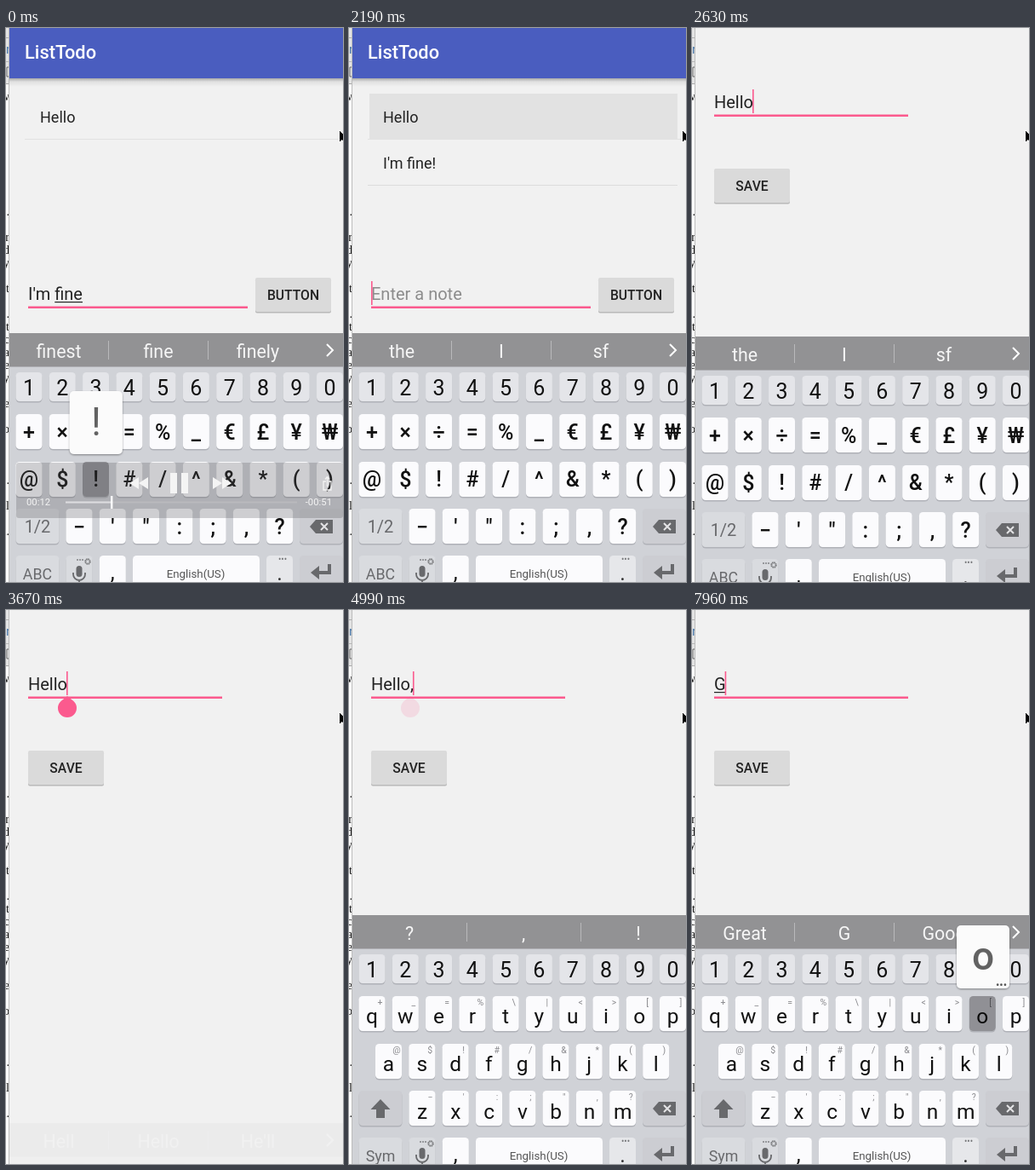
Recreate the animation shown at these times as an HTML page. Size 396x650 px, loop 8 s.

```html
<!DOCTYPE html>
<html lang="en">
<head>
<meta charset="utf-8">
<title>ListTodo</title>
<style>
  html, body { margin: 0; width: 100%; height: 100%; overflow: hidden; background: #f1f1f1; }
  svg { display: block; width: 396px; height: 650px; }
  text { font-family: Roboto, "Noto Sans", sans-serif; white-space: pre; }
</style>
</head>
<body>
<svg id="stage" viewBox="0 0 396 650">
  <defs>
    <linearGradient id="drop" x1="0" y1="0" x2="0" y2="1">
      <stop offset="0" stop-color="#000" stop-opacity=".3"/>
      <stop offset=".4" stop-color="#000" stop-opacity=".07"/>
      <stop offset="1" stop-color="#000" stop-opacity="0"/>
    </linearGradient>
    <filter id="soft" x="-20%" y="-20%" width="140%" height="140%">
      <feDropShadow dx="0" dy="1" stdDeviation="1.3" flood-color="#000" flood-opacity=".4"/>
    </filter>
    <clipPath id="edge"><rect width="4" height="650"/></clipPath>
    <clipPath id="phone"><rect x="4" width="392" height="650"/></clipPath>
  </defs>
</svg>
<script>
const LOOP = 8000, PINK = '#fb5a8e', INK = '#222', GREY = '#68696c';
const stage = document.getElementById('stage');

function mk(parent, tag, attrs = {}, text) {
  const node = document.createElementNS('http://www.w3.org/2000/svg', tag);
  for (const k in attrs) node.setAttribute(k, attrs[k]);
  if (text !== undefined) node.textContent = text;
  parent.appendChild(node);
  return node;
}
const group = (parent, attrs) => mk(parent, 'g', attrs);
const rect = (p, x, y, width, height, fill, rx = 0, more) =>
  mk(p, 'rect', { x, y, width, height, fill, rx, ...more });
const path = (p, d, fill, more) => mk(p, 'path', { d, fill, ...more });
const label = (p, x, y, size, str, fill = INK, anchor = 'middle', weight = 400) =>
  mk(p, 'text', { x, y, 'font-size': size, fill, 'text-anchor': anchor, 'font-weight': weight }, str);
const show = (node, on) => node.setAttribute('visibility', on ? 'inherit' : 'hidden');

// Window behind the phone
function buildEdge() {
  const g = group(stage, { 'clip-path': 'url(#edge)' });
  rect(g, 0, 0, 4, 650, '#fff');
  rect(g, 0, 0, 4, 66, '#e4e4e4');
  rect(g, 0, 11, 4, 1, '#b0b0b0');
  rect(g, 0, 39, 4, 1, '#b8b8b8');
  rect(g, 0, 65, 4, 1, '#a8a8a8');
  label(g, 5, 30, 15, 'r', '#4a78a8', 'end');
  path(g, 'M5 46H1V57H5', 'none', { stroke: '#666' });
  const bits = { 85: 'w', 220: 'o.', 250: 'er', 265: 'd', 280: 'ey', 310: 't', 340: '.', 355: 'st', 370: 'c',
    385: 'sa', 400: 'e', 415: 'y', 445: 'ie', 475: 'o', 535: '.', 565: 'l', 595: 'u.' };
  for (const y in bits)
    label(g, 4, y, 14, bits[y], '#111', 'end').style.fontFamily = '"Liberation Serif", serif';
  rect(g, 3, 0, 1, 650, '#bbb');
}

function button(p, x, y, str) {
  rect(p, x, y + 1.5, 89, 40, '#b9b9b9', 2);
  const face = rect(p, x, y, 89, 40, '#dadada', 2);
  label(p, x + 44.5, y + 26, 15.7, str, INK, 'middle', 500);
  return face;
}

function field(p, base, width, hintText) {
  const hint = label(p, 26, base, 20, hintText, '#8c8c8c', 'start');
  const text = label(p, 26, base, 20, '', INK, 'start');
  const under = rect(p, 26, base + 2, 0, 1.2, INK);
  rect(p, 26, base + 7.5, width, 2.5, PINK);
  const caret = rect(p, 26, base - 22, 1.6, 28, PINK);
  return (str, from, blink) => {
    text.textContent = str;
    show(hint, !str);
    const len = str ? text.getComputedTextLength() : 0;
    const start = from > 0 ? text.getSubStringLength(0, from) : 0;
    under.setAttribute('x', 26 + start);
    under.setAttribute('width', from < 0 ? 0 : len - start);
    caret.setAttribute('x', 26 + Math.max(0, len - 1));
    show(caret, blink);
  };
}

buildEdge();
const phone = group(stage, { 'clip-path': 'url(#phone)' });

// List screen
const list = group(phone);
rect(list, 4, 0, 392, 650, '#f1f1f1');
rect(list, 4, 59, 392, 10, 'url(#drop)');
rect(list, 4, 0, 392, 59, '#4a5dbf');
label(list, 22, 36, 21.8, 'ListTodo', '#fff', 'start', 500);
const rowHit = rect(list, 24, 77, 362, 53, '#e2e2e2');
label(list, 40, 110.5, 18, 'Hello', INK, 'start');
rect(list, 22, 130, 374, 1, '#e1e1e1');
const second = group(list);
label(second, 40, 164.5, 18, "I'm fine!", INK, 'start');
rect(second, 22, 184, 364, 1, '#dcdcdc');
const setNote = field(list, 319, 258, 'Enter a note');
const addFace = button(list, 293, 293, 'BUTTON');

// Edit screen
const edit = group(phone);
rect(edit, 4, 0, 392, 650, '#f1f1f1');
const setEdit = field(edit, 94, 228, 'Edit Item');
button(edit, 26, 165, 'SAVE');
const handle = path(edit, 'M72 101L79.5 107A11 11 0 1 1 64.5 107Z', PINK);

// Keyboard
const board = group(phone);
const STEP = 39.28, TOPS = [404, 453, 509, 564, 619];
const WHITE = '#fbfbfd', FUNC = '#d9dbdf', DARK = '#cccdd2';
rect(board, 4, 397, 392, 260, '#d0d2d7');
rect(board, 4, 358, 392, 39.5, '#929294');
const tips = group(board);

function key(p, cx, top, w, h, fill) {
  rect(p, cx - w / 2, top + 1.5, w, h, '#b0b2b8', 4.5);
  rect(p, cx - w / 2, top, w, h, fill, 4.5);
}
function keyRow(p, chars, x0, top, h, base, size, fill, weight) {
  [...chars].forEach((c, i) => {
    key(p, x0 + i * STEP, top, 31, h, fill);
    label(p, x0 + i * STEP, base, size, c, '#111', 'middle', weight);
  });
}
keyRow(board, '1234567890', 27, TOPS[0], 34, 430.5, 25, '#e4e5e9');

const sym = group(board);
keyRow(sym, '+×÷=%_€£¥₩', 27, TOPS[1], 41, 483, 25, WHITE, 500);
keyRow(sym, '@$!#/^&*()', 27, TOPS[2], 41, 538, 25, WHITE, 500);
keyRow(sym, '−\'":;,?', 86, TOPS[3], 41, 594, 25, WHITE, 500);

function letters(rows) {
  const g = group(board);
  const extras = ['+_=%\\|<>[]', '@$!#/&*()', '−\':;",?'];
  const x0 = [27, 46.5, 86];
  rows.forEach((chars, r) => {
    keyRow(g, chars, x0[r], TOPS[r + 1], 41, 485 + 56 * r, 24.5, WHITE);
    [...extras[r]].forEach((c, i) => label(g, x0[r] + 9.5 + i * STEP, TOPS[r + 1] + 11, 10.5, c, '#8a8a8e'));
  });
  key(g, 37, TOPS[3], 51, 41, DARK);
  return g;
}
const low = letters(['qwertyuiop', 'asdfghjkl', 'zxcvbnm']);
const up = letters(['QWERTYUIOP', 'ASDFGHJKL', 'ZXCVBNM']);
const ARROW = 'M37 574L48.5 586H42V596H32V586H25.5Z';
path(low, ARROW, GREY);
path(up, ARROW, '#1c86bd');

key(sym, 37, TOPS[3], 51, 41, FUNC);
label(sym, 37, 592, 20, '1/2', GREY);

const bottomKey = (cx, w, fill) => key(board, cx, TOPS[4], w, 41, fill);
bottomKey(37, 51, FUNC);
const modeKey = label(board, 37, 646.5, 17.8, '', GREY);
key(board, 370.5, TOPS[3], 51, 41, DARK);
path(board, 'M357 585L364 577H384V593H364Z', GREY);
path(board, 'M370 581L378 589M378 581L370 589', 'none', { stroke: '#e4e4e6', 'stroke-width': 2 });
bottomKey(86, 31, FUNC);
rect(board, 82.5, 631, 7, 13, GREY, 3.5);
path(board, 'M79 639V641A7 7 0 0 0 93 641V639M86 648V652', 'none', { stroke: GREY, 'stroke-width': 1.8 });
label(board, 87, 627, 9, '•••', '#77787b');
mk(board, 'circle', { cx: 96, cy: 626, r: 2.7, fill: 'none', stroke: '#77787b', 'stroke-width': 2, 'stroke-dasharray': '1.5 .6' });
bottomKey(125.3, 31, WHITE);
label(board, 125.3, 647, 25, ',', '#111');
bottomKey(223.5, 149, WHITE);
label(board, 223, 645, 13.3, 'English(US)', '#555');
bottomKey(321.5, 31, '#e6e7ea');
label(board, 321.5, 648, 25, '.', '#333');
label(board, 325, 627, 10, '•••', '#77787b');
bottomKey(370.5, 51, DARK);
path(board, 'M382 629V641H368V647L358 639L368 631V637H378V629Z', GREY);

const press = rect(board, 0, 0, 31, 41, '#929296', 4.5);
press.style.mixBlendMode = 'multiply';

// Player controls
const player = group(phone);
rect(player, 12, 510, 384, 65, '#55565a', 3, { 'fill-opacity': .27 });
const tri = (x, dir) => `M${x} 534L${x + 11 * dir} 527V541Z`;
path(player, tri(145, 1) + tri(156, 1) + tri(265, -1) + tri(254, -1), '#f4f4f4');
rect(player, 193, 522, 8, 24, '#f4f4f4');
rect(player, 206, 522, 8, 24, '#f4f4f4');
path(player, 'M376 532H373V542H382V532H379M377.5 538V527M375 529.5L377.5 526.5L380 529.5', 'none', { stroke: '#f4f4f4', 'stroke-width': 1.3 });
label(player, 24, 560, 11.3, '00:12', '#f4f4f4', 'start');
label(player, 383, 560, 11.3, '-00:51', '#f4f4f4', 'end');
rect(player, 70, 555.5, 272, 2, '#b9babd');
rect(player, 70, 555.5, 54, 2, '#dddde0');
rect(player, 123, 549, 2.4, 15, '#fff');

// Key preview
const popup = group(phone);
rect(popup, -31, 0, 62, 74, '#fbfbfb', 5, { filter: 'url(#soft)' });
const popChar = label(popup, 0, 52, 46, '', '#626262', 'middle', 500);
const popDots = label(popup, 21.5, 73.5, 13, '•••', '#555');

// Mouse pointer
path(stage, 'M391.5 119.5V134.5L395 131.5L398 137.5L402 135.5V130Z', '#000', { stroke: '#fff', 'stroke-width': 1 });

const HELL = ['Hell', 'Hello', "He'll"], PLAIN = ['the', 'I', 'sf'], MARKS = ['?', ',', '!'];

function setTips(words) {
  tips.replaceChildren();
  const marks = words === MARKS;
  const xs = marks ? [71, 205, 340] : [62, 179, 296];
  words.forEach((w, i) => label(tips, xs[i], 386.5, 21.4, w, '#f6f6f6'));
  for (const x of marks ? [138, 272] : [120, 237]) rect(tips, x, 367, 1, 22, '#b9b9bb');
  if (!marks) path(tips, 'M377 371L384 378L377 385', 'none', { stroke: '#fff', 'stroke-width': 2 });
}

// Each step changes part of the state; pop is [x, key top, char], hit is [x, top, width]
const steps = [
  [0, { note: "I'm fine", from: 4, caret: 0, tips: ['finest', 'fine', 'finely'], keys: 'sym', kbY: 0, kbA: 1,
        player: 1, pop: [105.8, 509, '!'], hit: [105.5, 509], face: '#dadada', second: 0, row: 0,
        edit: 'Hello', editY: 0, editA: 0, handle: 0 }],
  [140, { note: "I'm fine!", from: -1, caret: 1, tips: MARKS, player: 0, pop: 0, hit: 0 }],
  [590, { face: '#cbcbcb' }],
  [730, { note: '', second: 1, tips: PLAIN, face: '#c6c6c6' }],
  [880, { face: '#d1d1d1' }],
  [1020, { face: '#dadada' }],
  [1310, { caret: 0 }],
  [1750, { caret: 1 }],
  [2190, { row: 1 }],
  [2340, { editA: .6, editY: 20 }],
  [2490, { editA: 1, editY: 0, kbY: 4 }],
  [2640, { kbY: 130, kbA: .4 }],
  [2780, { kbA: 0 }],
  [3230, { caret: 0 }],
  [3670, { caret: 1, handle: 1, keys: 'low', tips: HELL, kbY: 244, kbA: .05 }],
  [3820, { kbY: 45, kbA: .8 }],
  [3970, { kbY: 0, kbA: 1 }],
  [4260, { caret: 0 }],
  [4700, { caret: 1, pop: [125.3, 619, ','] }],
  [4850, { edit: 'Hello,', pop: 0, tips: MARKS, handle: .6 }],
  [4990, { handle: .15 }],
  [5140, { handle: 0 }],
  [5440, { caret: 0 }],
  [5740, { caret: 1, hit: [370.5, 564, 51] }],
  [5890, { edit: 'Hello', tips: HELL }],
  [6030, { edit: 'Hell' }],
  [6180, { edit: 'Hel' }],
  [6330, { edit: 'H' }],
  [6470, { edit: '', tips: PLAIN }],
  [6620, { hit: 0 }],
  [7070, { caret: 0 }],
  [7370, { keys: 'up' }],
  [7670, { caret: 1, pop: [203.6, 509, 'G'], hit: [203.6, 509] }],
  [7820, { edit: 'G', from: 0, keys: 'low', tips: ['Great', 'G', 'Good'], pop: 0, hit: 0 }],
  [7960, { pop: [342, 453, 'o'], hit: [341.3, 453] }],
];
let state = {};
const states = steps.map(([at, change]) => ({ at, ...(state = { ...state, ...change }) }));

function render(s) {
  setNote(s.note, s.editA ? -1 : s.from, s.caret);
  setEdit(s.edit, s.editA ? s.from : -1, s.caret);
  show(second, s.second);
  show(rowHit, s.row);
  addFace.setAttribute('fill', s.face);
  show(edit, s.editA);
  edit.setAttribute('opacity', s.editA);
  edit.setAttribute('transform', `translate(0 ${s.editY})`);
  handle.setAttribute('opacity', s.handle);

  show(board, s.kbA);
  board.setAttribute('opacity', s.kbA);
  board.setAttribute('transform', `translate(0 ${s.kbY})`);
  setTips(s.tips);
  show(sym, s.keys === 'sym');
  show(low, s.keys === 'low');
  show(up, s.keys === 'up');
  modeKey.textContent = s.keys === 'sym' ? 'ABC' : 'Sym';

  show(press, s.hit);
  if (s.hit) {
    const [x, top, w = 31] = s.hit;
    press.setAttribute('x', x - w / 2);
    press.setAttribute('y', top);
    press.setAttribute('width', w);
  }
  show(popup, s.pop);
  if (s.pop) {
    const [x, top, char] = s.pop;
    popup.setAttribute('transform', `translate(${x} ${top - 83})`);
    popChar.textContent = char;
    popChar.setAttribute('font-weight', char === '!' ? 400 : 500);
    show(popDots, s.keys !== 'sym');
  }
  show(player, s.player);
}

const begin = performance.now();
let current;
function tick() {
  const t = (performance.now() - begin) % LOOP;
  const next = states.findLast(s => s.at <= t);
  if (next !== current) render(current = next);
  requestAnimationFrame(tick);
}
tick();
</script>
</body>
</html>
```
